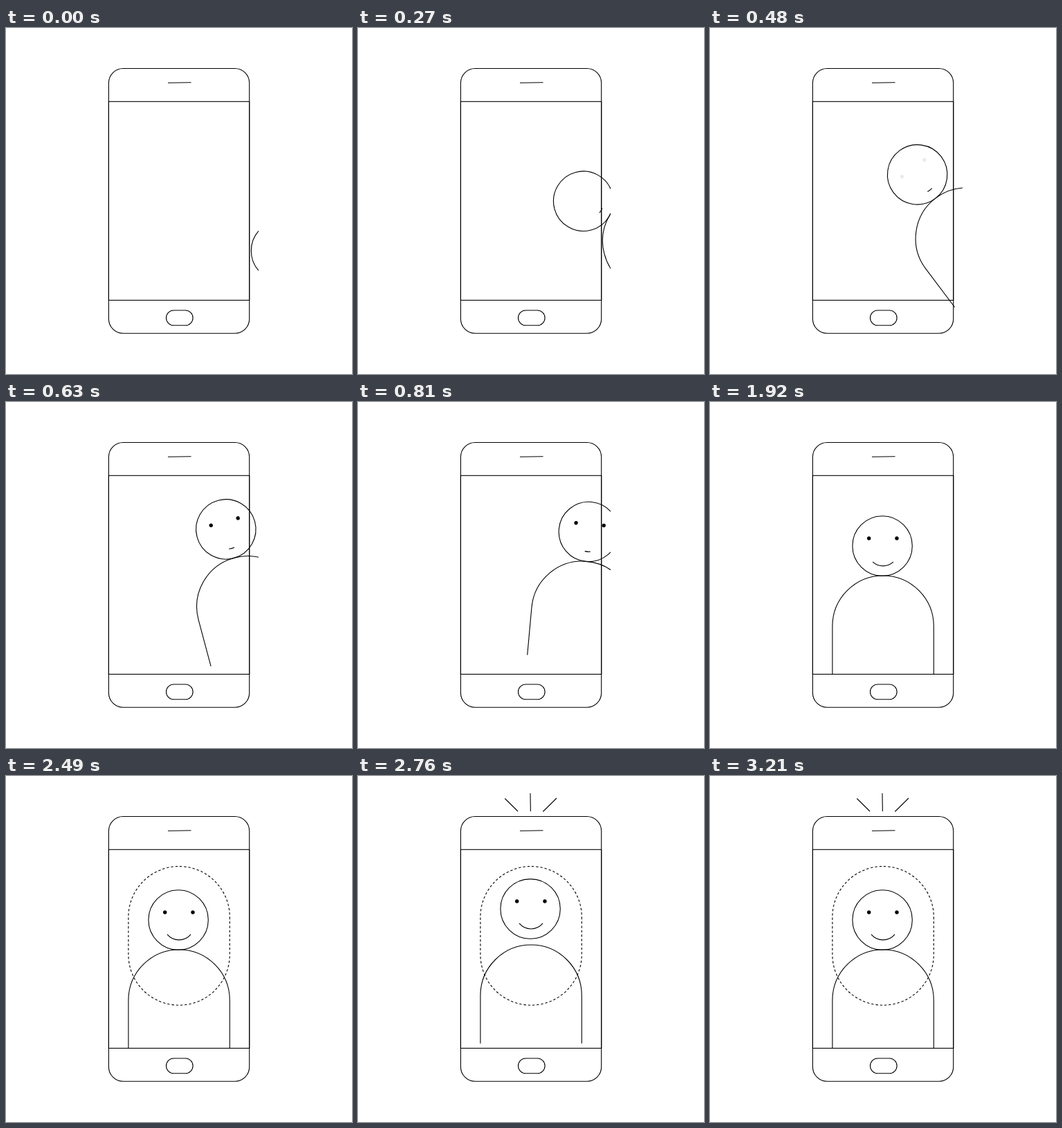
An HTML page that plays this animation: 500 by 500 pixels, repeating every 3630 ms.

```html
<!DOCTYPE html>
<html lang="en">
<head>
<meta charset="utf-8">
<title>Phone selfie</title>
<style>
  html, body { margin: 0; width: 100%; height: 100%; overflow: hidden; background: #fff; }
  svg { display: block; width: 100vw; height: 100vh; }
  .ink { fill: none; stroke: #000; stroke-width: 1.1; }
</style>
</head>
<body>
<svg viewBox="0 0 500 500">
  <defs>
    <clipPath id="stage"><rect width="365" height="500"/></clipPath>
    <path id="outline" d="M323.3 203.8V258A73.2 73.2 0 0 1 176.9 258V203.8A73.2 73.2 0 0 1 323.3 203.8"/>
    <mask id="reveal" maskUnits="userSpaceOnUse" x="0" y="0" width="500" height="500">
      <path id="sweep" pathLength="1" fill="none" stroke="#fff" stroke-width="5"
        d="M323.3 203.8V258A73.2 73.2 0 0 1 176.9 258V203.8A73.2 73.2 0 0 1 323.3 203.8"/>
    </mask>
  </defs>
  <g class="ink">
    <rect x="148.4" y="58.5" width="203.3" height="382.7" rx="21"/>
    <rect x="148.4" y="106.3" width="203.3" height="287.1"/>
    <path d="M234 79.3L267.5 78.8"/>
    <rect x="231.5" y="408" width="38.6" height="21.8" rx="10.9"/>
  </g>
  <g class="ink" clip-path="url(#stage)">
    <g id="person">
      <path id="body" d="M176.9 393.5V324.2A73.2 73.2 0 0 1 323.3 324.2V393.5"/>
      <g id="head">
        <circle cx="249.1" cy="208" r="43.2"/>
        <g id="eyes" fill="#000" stroke="none">
          <circle cx="229.7" cy="197" r="2.7"/>
          <circle cx="270" cy="197" r="2.7"/>
        </g>
        <path id="mouth"/>
      </g>
    </g>
  </g>
  <g id="frame" class="ink" mask="url(#reveal)">
    <use href="#outline" stroke-dasharray="3.4 2.9"/>
  </g>
  <g id="rays" class="ink">
    <path pathLength="1" d="M231 51L212.3 32.5"/>
    <path pathLength="1" d="M249.4 51L249 25"/>
    <path pathLength="1" d="M267.3 51.5L287 32"/>
  </g>
</svg>
<script>
const LOOP = 3630, STEP = 30;
const FOOT = [250, 393.5];

// time, foot x, foot y, tilt in degrees
const WALK = [
  [0, 583, 321, -90],
  [480, 412, 359.5, -37],
  [540, 392.5, 365, -33],
  [690, 350, 362.3, -4],
  [810, 317.5, 372.3, 5.2],
  [1080, 250, 393.5, 0]
];

const $ = id => document.getElementById(id);
const clamp = v => Math.min(1, Math.max(0, v));
const ease = (t, a, b) => {
  const p = clamp((t - a) / (b - a));
  return p * p * (3 - 2 * p);
};

function slope(i, k) {
  const last = WALK.length - 1;
  const a = WALK[Math.max(0, i - 1)], b = WALK[Math.min(last, i + 1)];
  const s = (b[k] - a[k]) / (b[0] - a[0]);
  return i === last ? s / 2 : s;
}

// Cubic Hermite curve through the walk table
function walk(t, k) {
  const last = WALK.length - 1;
  if (t >= WALK[last][0]) return WALK[last][k];
  const i = WALK.findIndex(row => row[0] > t) - 1;
  const a = WALK[i], b = WALK[i + 1], d = b[0] - a[0];
  const p = (t - a[0]) / d, q = 1 - p;
  return q * q * (1 + 2 * p) * a[k] + p * p * (3 - 2 * p) * b[k]
    + d * p * q * (q * slope(i, k) - p * slope(i + 1, k));
}

function smile(t) {
  const angle = (10.5 + 40.1 * ease(t, 1500, 2090)) * Math.PI / 180;
  const r = 22, dx = r * Math.sin(angle), y = 214.9 + r * Math.cos(angle);
  return `M${250 - dx} ${y}A${r} ${r} 0 0 0 ${250 + dx} ${y}`;
}

function trim(el, p) {
  el.setAttribute("stroke-dasharray", p < 1 ? `${p} 2` : "none");
}

function draw(t) {
  const x = walk(t, 1), y = walk(t, 2), tilt = walk(t, 3);
  $("person").setAttribute("transform",
    `translate(${x} ${y}) rotate(${tilt}) translate(${-FOOT[0]} ${-FOOT[1]})`);

  const hop = Math.sin(Math.PI * clamp((t - 2550) / 480)) ** 2;
  $("head").setAttribute("transform", `translate(0 ${-16.6 * hop})`);
  $("body").setAttribute("transform", `translate(0 ${-7.2 * hop})`);

  const blink = (t >= 1320 && t < 1500) || (t >= 3030 && t < 3210);
  $("eyes").setAttribute("opacity", blink ? 0 : ease(t, 450, 630));
  $("mouth").setAttribute("d", smile(t));

  const shown = ease(t, 2010, 2490);
  $("frame").style.display = shown ? "" : "none";
  trim($("sweep"), shown);

  const flash = ease(t, 2550, 2700);
  $("rays").style.display = flash ? "" : "none";
  for (const ray of $("rays").children) trim(ray, flash);
}

const start = performance.now();
function tick() {
  const t = (performance.now() - start) % LOOP;
  draw(Math.floor(t / STEP) * STEP);
  requestAnimationFrame(tick);
}
draw(0);
requestAnimationFrame(tick);
</script>
</body>
</html>
```
